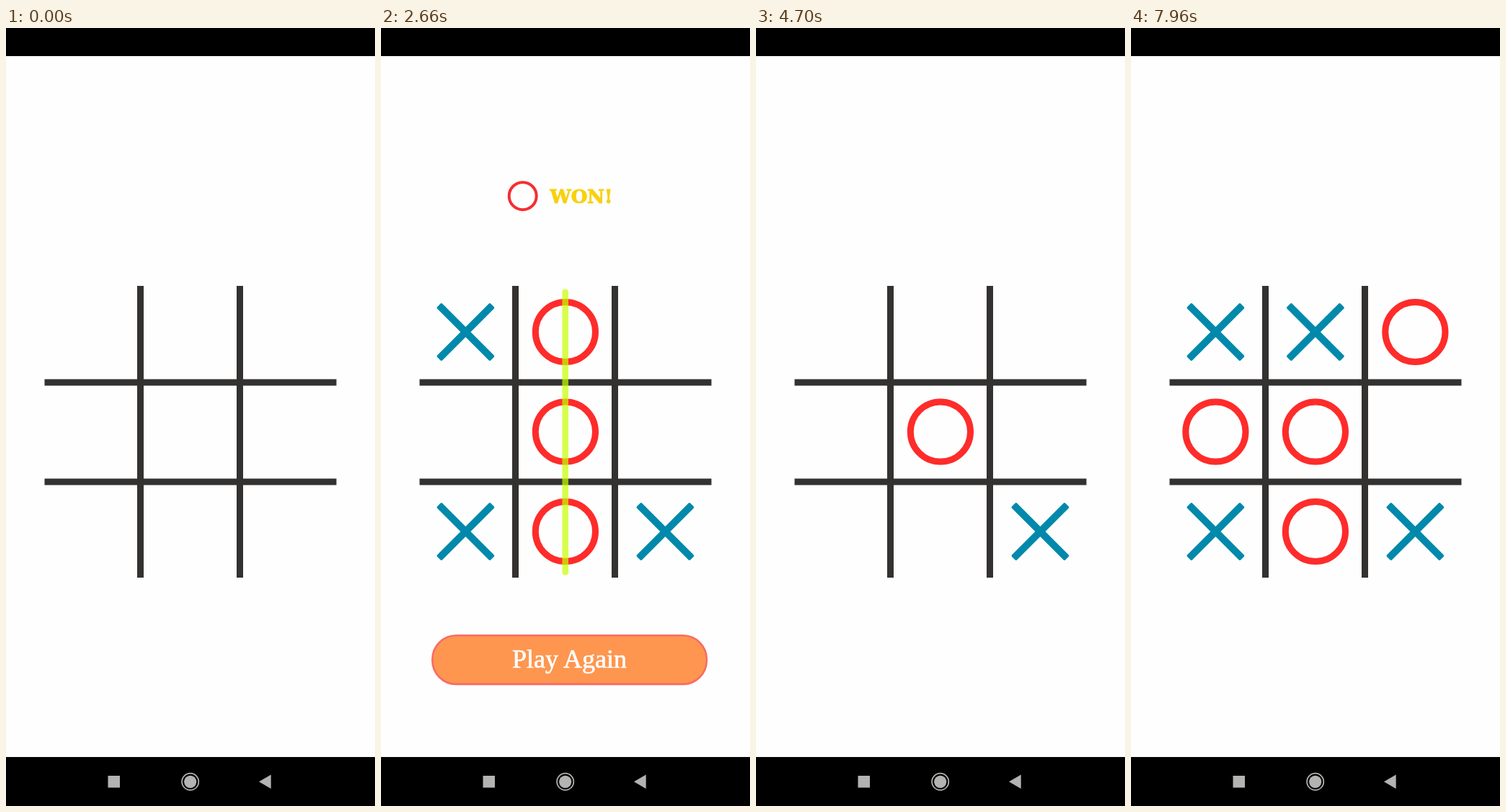
Write an HTML page that moves like this. It is 512 by 1080 pixels and loops after 8 s.

```html
<!DOCTYPE html>
<html lang="en">
<head>
<meta charset="utf-8">
<title>Noughts and crosses</title>
<style>
  html, body { margin: 0; width: 100%; height: 100%; overflow: hidden; background: #000; }
  svg { display: block; width: 512px; height: 1080px; }
</style>
</head>
<body>
<svg viewBox="0 0 512 1080">
  <defs>
    <g id="cross" fill="#0089ab">
      <rect x="-52.5" y="-5" width="105" height="10" rx="2" transform="rotate(45)"/>
      <rect x="-52.5" y="-5" width="105" height="10" rx="2" transform="rotate(-45)"/>
    </g>
    <circle id="nought" r="41.6" fill="none" stroke="#fe2c2a" stroke-width="9"/>
  </defs>

  <rect y="39" width="512" height="973" fill="#fefefe"/>
  <path d="M186.5 358V763M324.5 358V763M53.5 492H458.5M53.5 630H458.5" stroke="#343131" stroke-width="9"/>
  <g id="marks"></g>

  <g id="result">
    <path d="M255.7 366.5V755.5" stroke="#c8ff00" stroke-opacity=".7" stroke-width="8.5" stroke-linecap="round"/>
    <circle cx="196.7" cy="233.2" r="19" fill="none" stroke="#f52e31" stroke-width="4"/>
    <text x="234.5" y="243" font-family="'DejaVu Serif', serif" font-weight="bold" font-size="26"
      fill="#f8d010" stroke="#f8d010" stroke-width="1">WON!</text>
  </g>
  <g id="button">
    <rect x="71.3" y="843.3" width="380.6" height="67.6" rx="33" fill="#fe964f" stroke="#fb6a66" stroke-width="2.6"/>
    <text x="261.5" y="888" text-anchor="middle" font-family="'Liberation Serif', serif" font-size="36"
      fill="#fff" stroke="#fff" stroke-width=".7">Play Again</text>
  </g>

  <g fill="#b3b3b1">
    <rect x="141.5" y="1038" width="16.5" height="16.5"/>
    <circle cx="255.7" cy="1046.3" r="8.6"/>
    <circle cx="255.7" cy="1046.3" r="11.6" fill="none" stroke="#b3b3b1" stroke-width="1.7"/>
    <path d="M351 1046.3L367.7 1036.5V1056Z"/>
  </g>
</svg>
<script>
const LOOP = 8000, CLEARED = 3810;
const marks = document.getElementById('marks');
const timed = [];

function showBetween(element, start, end) {
  timed.push({ element, start, end });
}

function addMark(kind, column, row, start, end) {
  const mark = document.createElementNS('http://www.w3.org/2000/svg', 'use');
  mark.setAttribute('href', '#' + kind);
  mark.setAttribute('x', 117.4 + 138.5 * column);
  mark.setAttribute('y', 422 + 138.5 * row);
  marks.append(mark);
  showBetween(mark, start, end);
}

// Each turn: time, cross column and row, reply column and row.
function playGame(turns, end) {
  for (const [time, crossX, crossY, noughtX, noughtY] of turns) {
    addMark('cross', crossX, crossY, time, end);
    addMark('nought', noughtX, noughtY, time + 150, end);
  }
}

playGame([[530, 0, 2, 1, 1], [1640, 2, 2, 1, 2], [2250, 0, 0, 1, 0]], CLEARED);
playGame([[4260, 2, 2, 1, 1], [5250, 0, 0, 1, 2], [6900, 1, 0, 2, 0], [7680, 0, 2, 0, 1]], LOOP);
showBetween(document.getElementById('result'), 2430, CLEARED);
showBetween(document.getElementById('button'), 2430, CLEARED);

function draw() {
  const time = performance.now() % LOOP;
  for (const { element, start, end } of timed) {
    element.style.display = time >= start && time < end ? '' : 'none';
  }
  requestAnimationFrame(draw);
}
draw();
</script>
</body>
</html>
```
